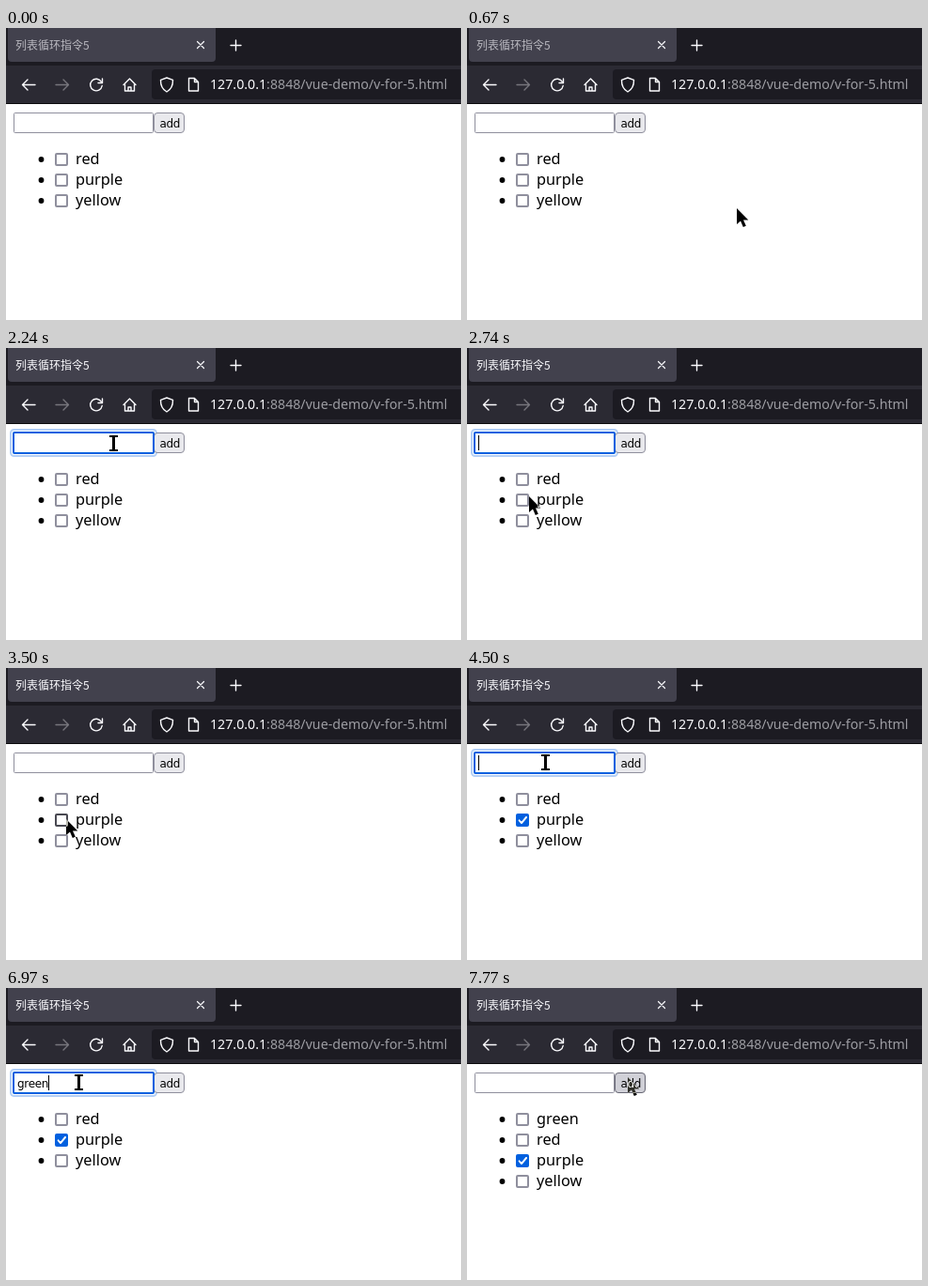
These frames come from a looping animation (484 by 311 pixels, 8000 ms). An HTML page:

```html
<!DOCTYPE html>
<html lang="zh">
<head>
<meta charset="utf-8">
<title>v-for</title>
<style>
  html, body { margin: 0; width: 100%; height: 100%; overflow: hidden; background: #fff; }
  svg { display: block; }
  text { white-space: pre; }
  .title { font: 12px "Noto Sans CJK SC", "Noto Sans CJK", sans-serif; }
  .url { font: 14.2px "Noto Sans", sans-serif; fill: #9d9da3; }
  .item { font: 16.3px "Noto Sans", sans-serif; }
  .ui { font: 12px "DejaVu Sans", sans-serif; letter-spacing: -.3px; }
  .icon { fill: none; stroke: #fbfbfe; stroke-width: 1.4; stroke-linecap: round; stroke-linejoin: round; }
  #cursor { fill: #fff; mix-blend-mode: difference; }
</style>
</head>
<body>
<svg width="484" height="311" viewBox="0 0 484 311">
  <rect width="484" height="311" fill="#fff"/>
  <rect width="484" height="40" fill="#1c1b22"/>
  <rect x="2" y="-8" width="221" height="44" rx="4" fill="#42414d"/>
  <rect y="40" width="484" height="40" fill="#2b2a33"/>
  <rect y="80" width="484" height="1" fill="#0c0c0d"/>
  <rect x="155" y="44" width="340" height="32" rx="4" fill="#1c1b22"/>
  <text id="title" class="title" x="10" y="22.5">列表循环指令5</text>
  <text class="url" x="217" y="65"><tspan fill="#fbfbfe">127.0.0.1</tspan>:8848/vue-demo/v-for-5.html</text>
  <g class="icon">
    <path d="M203.5 14.5l7 7m0-7l-7 7" stroke-width="1.2"/>
    <path d="M239 18.5h11m-5.5-5.5v11"/>
    <path d="M31 60.5H17.5m5.5-5.5l-5.5 5.5l5.5 5.5"/>
    <path d="M53 60.5h13.5m-5.5-5.5l5.5 5.5l-5.5 5.5" stroke="#77767d"/>
    <path d="M101.5 57.5a6.3 6.3 0 1 0 .7 4M102.5 54v4.5h-4.5"/>
    <path d="M125 60.5l6.5-6.5l6.5 6.5M126.5 59.5v7.5h10v-7.5M130 67v-4h3v4"/>
    <path d="M171 53l6.5 2.3c.2 6-1.5 9.9-6.5 12.7c-5-2.8-6.7-6.7-6.5-12.7z"/>
    <path d="M194.5 53.5h6l4 4v9.5h-10zM200.5 53.5v4h4"/>
  </g>
  <rect id="halo" x="5" y="87" width="155" height="28" rx="3.5" fill="none" stroke="#b3cff5" stroke-width="2"/>
  <rect id="button" x="157.5" y="90.5" width="32" height="21" rx="3.5"/>
  <text class="ui" x="163.5" y="106">add</text>
  <rect id="field" fill="#fff" rx="1"/>
  <text id="typed" class="ui" x="12" y="106"></text>
  <rect id="caret" y="93" width="1" height="16"/>
  <g id="rows"></g>
  <path id="cursor"/>
</svg>
<script>
const LOOP = 8000, BLINK = 540;
const FOCUS = 1270, BLUR = 3400, CHECK = 3570, REFOCUS = 4270, PRESS = 7540, ADD = 7660;
const KEYS = [5140, 5500, 5800, 5970, 6170];

// pointer moves, each from the previous resting point
const home = { x: 445, y: 230 };
const moves = [
  { from: 500, to: 1100, x: 122, y: 97 },
  { from: 2225, to: 2400, x: 76, y: 143 },
  { from: 2540, to: 2870, x: 64, y: 167 },
  { from: 3140, to: 3450, x: 64, y: 161 },
  { from: 3800, to: 4200, x: 83, y: 100 },
  { from: 4500, to: 4600, x: 77, y: 100 },
  { from: 7140, to: 7370, x: 171, y: 95 }
];
const arrow = "M0 0V17L4 13.500L6.800 20L9.800 18.700L7 12.400H12.300Z";
const beam = "M-4-8h9v2h-3v13h3v2h-9v-2h3v-13h-3z";
const tick14 = "M-4.500 .5L-1.500 4H-.5L5-2.500L4.750-4H3.500L-.5 1L-1.500 1.250L-3.500-1Z";

const $ = id => document.getElementById(id);
const set = (id, attrs) => { for (const k in attrs) $(id).setAttribute(k, attrs[k]); };
const show = on => on ? "visible" : "hidden";
const within = (t, a, b) => t >= a && t < b;

// sideways motion eases out, vertical motion is steady
function pointer(t) {
  let { x, y } = home;
  for (const m of moves) {
    const k = Math.min(1, Math.max(0, (t - m.from) / (m.to - m.from)));
    x += (m.x - x) * k * (2 - k);
    y += (m.y - y) * k;
  }
  return [Math.round(x), Math.round(y)];
}

function caretOn(t, typed) {
  if (KEYS.some(k => within(t, k, k + BLINK / 2))) return true;
  const since = t - (t < REFOCUS ? FOCUS : REFOCUS);
  return (Math.floor(since / BLINK) + (typed > 0)) % 2 === 0;
}

const border = (hover, press) => press ? "#484851" : hover ? "#676774" : "#8f8f9d";

function row(name, y, checked, hover, press) {
  const box = checked
    ? `<rect x="52" y="${y - 7}" width="14" height="14" rx="2" fill="${hover ? "#0250bb" : "#0060df"}"/>
       <path d="${tick14}" transform="translate(59 ${y})" fill="#fff"/>`
    : `<rect x="53" y="${y - 6}" width="12" height="12" rx="1" fill="#fff" stroke="${border(hover, press)}" stroke-width="2"/>`;
  return `<circle cx="37.5" cy="${y}" r="2.9"/>${box}<text class="item" x="74" y="${y + 5}">${name}</text>`;
}

function draw(t) {
  const [x, y] = pointer(t);
  const over = (left, top, w, h) => within(x, left, left + w) && within(y, top, top + h);
  const onField = over(8, 90, 149, 22), onButton = over(157, 90, 33, 22);
  const focus = within(t, FOCUS, BLUR) || within(t, REFOCUS, PRESS);
  const press = within(t, PRESS, ADD), added = t >= ADD;
  const typed = added ? 0 : KEYS.filter(k => t >= k).length;

  set("title", { fill: t < FOCUS ? "#b9b8bf" : "#fbfbfe" });
  set("halo", { visibility: show(focus) });
  set("field", focus
    ? { x: 8, y: 90, width: 149, height: 22, stroke: "#0060df", "stroke-width": 2 }
    : { x: 8.5, y: 90.5, width: 148, height: 21, stroke: border(onField), "stroke-width": 1 });
  set("button", {
    fill: press ? "#b1b1b9" : onButton ? "#d0d0d7" : "#e9e9ed",
    stroke: border(onButton, press)
  });
  $("typed").textContent = "green".slice(0, typed);
  const width = typed ? $("typed").getComputedTextLength() : 0;
  set("caret", { x: Math.floor(12 + width), visibility: show(focus && caretOn(t, typed)) });

  const items = ["red", "purple", "yellow"];
  if (added) items.unshift("green");
  $("rows").innerHTML = items.map((name, i) => {
    const cy = 140 + 22 * i, picked = name === "purple";
    return row(name, cy, picked && t >= CHECK, over(52, cy - 7, 14, 14), picked && within(t, BLUR, CHECK));
  }).join("");

  set("cursor", {
    d: onField ? beam : arrow,
    transform: `translate(${x} ${y})`,
    visibility: show(t >= moves[0].from)
  });
}

const start = performance.now();
function frame() {
  draw((performance.now() - start) % LOOP);
  requestAnimationFrame(frame);
}
frame();
</script>
</body>
</html>
```
